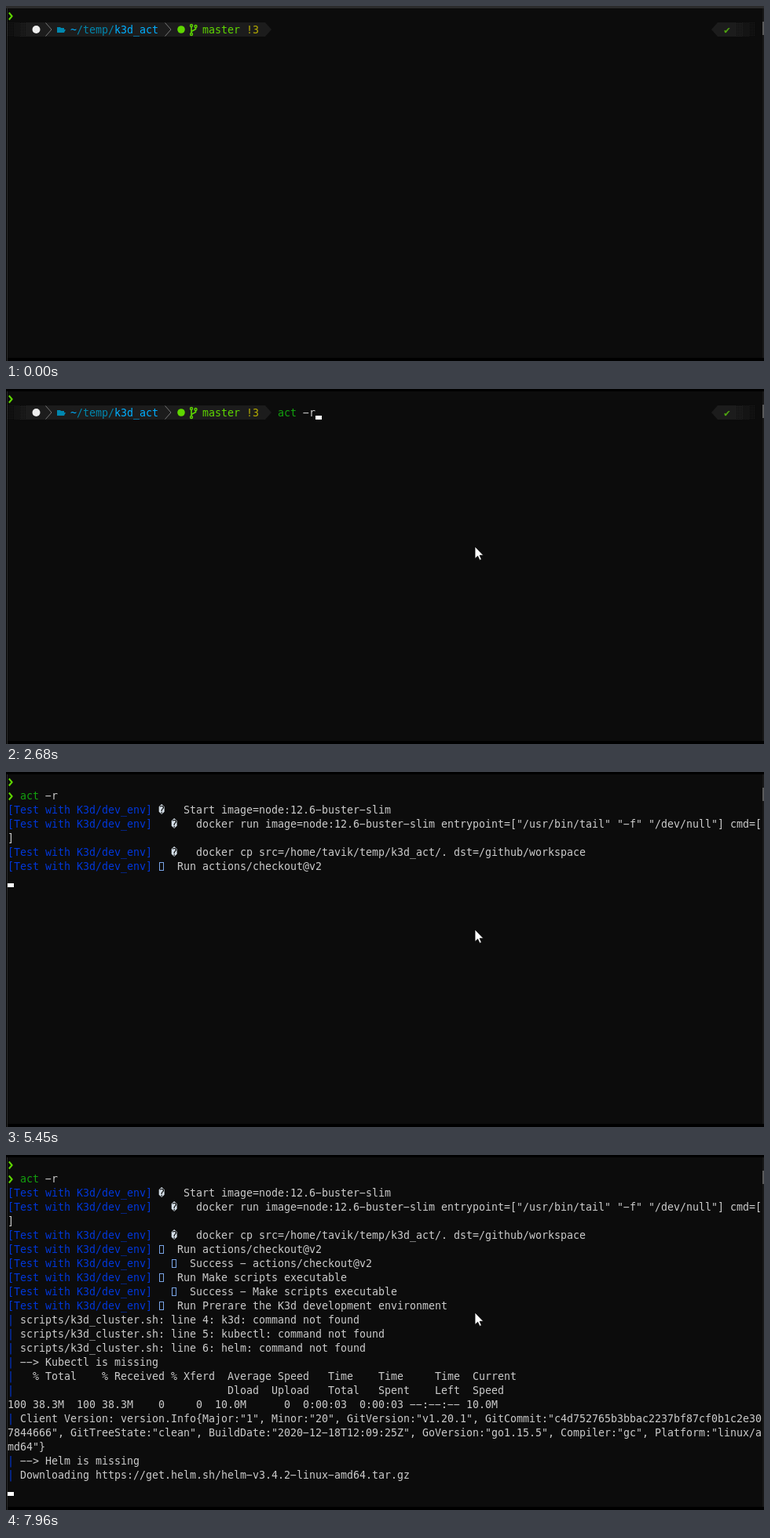
Write an HTML page with a canvas that moves like this. It is 965 by 453 pixels and loops after 8000 ms.

```html
<!DOCTYPE html>
<html lang="en">
<head>
<meta charset="utf-8">
<title>Terminal session</title>
<style>
html, body { margin: 0; width: 965px; height: 453px; overflow: hidden; background: #000; }
canvas { display: block; }
</style>
</head>
<body>
<canvas id="stage" width="965" height="453"></canvas>
<script>
const ctx = document.getElementById('stage').getContext('2d');
const LOOP = 8000, CELL = 8, ROW = 18;
const BG = '#0c0c0c', BAR = '#1c1c1c', FG = '#cccccc', BLUE = '#0037da', GREEN = '#13a10e',
      LIME = '#5fd700', DIR = '#0087af', SKY = '#00afff', TINT = '#7aa5e6';
const TAG = '[Test with K3d/dev_env]';

// Each output line: time of appearance, text
const output = [
  [3300, TAG + ' \uFFFD   Start image=node:12.6-buster-slim'],
  [4340, TAG + '   \uFFFD   docker run image=node:12.6-buster-slim entrypoint=["/usr/bin/tail" "-f" "/dev/null"] cmd=['],
  [4340, ']'],
  [4490, TAG + '   \uFFFD   docker cp src=/home/tavik/temp/k3d_act/. dst=/github/workspace'],
  [5450, TAG + ' ▯  Run actions/checkout@v2'],
  [5520, TAG + '   ▯  Success - actions/checkout@v2'],
  [5520, TAG + ' ▯  Run Make scripts executable'],
  [6460, TAG + '   ▯  Success - Make scripts executable'],
  [6540, TAG + ' ▯  Run Prerare the K3d development environment'],
  [6620, '| scripts/k3d_cluster.sh: line 4: k3d: command not found'],
  [6620, '| scripts/k3d_cluster.sh: line 5: kubectl: command not found'],
  [6620, '| scripts/k3d_cluster.sh: line 6: helm: command not found'],
  [6620, '| --> Kubectl is missing'],
  [6850, '|   % Total    % Received % Xferd  Average Speed   Time    Time     Time  Current'],
  [6850, '|                                  Dload  Upload   Total   Spent    Left  Speed'],
  [7250, '100 38.3M  100 38.3M    0     0  10.0M      0  0:00:03  0:00:03 --:--:-- 10.0M'],
  [7330, '| Client Version: version.Info{Major:"1", Minor:"20", GitVersion:"v1.20.1", GitCommit:"c4d752765b3bbac2237bf87cf0b1c2e30'],
  [7330, '7844666", GitTreeState:"clean", BuildDate:"2020-12-18T12:09:25Z", GoVersion:"go1.15.5", Compiler:"gc", Platform:"linux/a'],
  [7330, 'md64"}'],
  [7330, '| --> Helm is missing'],
  [7960, '| Downloading https://get.helm.sh/helm-v3.4.2-linux-amd64.tar.gz']
];

const colX = col => 2 + col * CELL;
const rowY = row => 3 + row * ROW;

function rect(x, y, w, h, color) {
  ctx.fillStyle = color;
  ctx.fillRect(x, y, w, h);
}

function trace(points) {
  ctx.beginPath();
  points.forEach(([x, y]) => ctx.lineTo(x, y));
}

function fill(points, color) {
  trace(points);
  ctx.fillStyle = color;
  ctx.fill();
}

function stroke(points, color, width) {
  trace(points);
  ctx.strokeStyle = color;
  ctx.lineWidth = width;
  ctx.stroke();
}

function disc(x, y, r, color) {
  ctx.beginPath();
  ctx.arc(x, y, r, 0, 7);
  ctx.fillStyle = color;
  ctx.fill();
}

// Text on the character grid; hyphens are drawn wide
function text(str, col, row, color) {
  [...str].forEach((ch, i) => {
    const x = colX(col + i), y = rowY(row);
    if (ch === '▯') {
      ctx.strokeStyle = TINT;
      ctx.lineWidth = 1;
      ctx.strokeRect(x + 1.5, y + 4.5, 5, 10);
    } else if (ch !== ' ') {
      ctx.fillStyle = ch === '\uFFFD' ? '#d5dfe8' : color;
      ctx.fillText(ch === '-' ? '−' : ch, x, y + 14);
    }
  });
}

function line(str, row) {
  const head = str.startsWith(TAG) ? TAG.length : str[0] === '|' ? 1 : 0;
  text(str.slice(0, head), 0, row, BLUE);
  text(str.slice(head), head, row, FG);
}

function arrowPrompt(row) {
  const y = rowY(row);
  stroke([[3.8, y + 5.5], [7.6, y + 10], [3.8, y + 14.5]], LIME, 2);
}

// Dotted cell, level 1 (sparse) to 3 (dense)
function shade(col, level) {
  for (let y = 0; y < ROW; y++)
    for (let x = 0; x < CELL; x++) {
      const even = (x + y) % 2 === 0, sparse = x % 2 === 0 && y % 2 === 0;
      const on = level === 1 ? sparse : level === 2 ? even : !sparse;
      if (on) rect(colX(col) + x, rowY(1) + y, 1, 1, BAR);
    }
}

function separator(col) {
  const x = colX(col);
  stroke([[x + 0.5, 21.5], [x + 8, 30], [x + 0.5, 38.5]], '#777', 1);
}

function branch() {
  stroke([[236, 25], [236, 35]], LIME, 1.6);
  stroke([[241.5, 27], [241.5, 29.5], [236, 32.5]], LIME, 1.6);
  for (const [x, y] of [[236, 25], [241.5, 26], [236, 36]]) {
    disc(x, y, 2.2, LIME);
    disc(x, y, 0.8, BAR);
  }
}

function statusBar() {
  for (let i = 0; i < 3; i++) {
    shade(i, i + 1);
    shade(116 + i, 3 - i);
  }
  rect(26, 21, 304, ROW, BAR);
  fill([[330, 21], [338, 30], [330, 39]], BAR);
  rect(906, 21, 24, ROW, BAR);
  fill([[906, 21], [898, 30], [906, 39]], BAR);

  disc(38.5, 30, 5, '#eee');
  separator(6);
  fill([[65, 27], [69, 27], [70, 28], [74, 28], [74, 30], [76, 30], [74, 34], [65, 34]], DIR);
  text('~', 10, 1, SKY);
  text('/temp/', 11, 1, DIR);
  text('k3d_act', 17, 1, SKY);
  separator(25);
  disc(223, 30, 4.8, LIME);
  branch();
  text('master', 31, 1, LIME);
  text('!3', 38, 1, '#b5ac00');
  text('✔', 114, 1, '#4fa510');
}

function command(str, col) {
  text(str.slice(0, 3), col, 1, GREEN);
  text(str.slice(3), col + 3, 1, FG);
}

function caret(col, row) {
  rect(colX(col), rowY(row) + 13, CELL, 5, '#fff');
}

// Pointer moves in 80 ms steps: up from the bottom edge, a pause, then to its rest
function pointer(t) {
  if (t < 70) return;
  const glide = (start, from, to) => {
    const k = Math.min(7, Math.max(0, Math.floor((t - start) / 80))) / 7;
    const e = k * k * (3 - 2 * k);
    return from.map((v, i) => Math.round(v + (to[i] - v) * e));
  };
  const [x, y] = t < 780 ? glide(70, [841, 442], [403, 73]) : glide(780, [403, 73], [597, 201]);
  const shape = [[0, 0], [0, 15.5], [3.6, 12.2], [6, 17.4], [8.4, 16.4], [6.1, 11.3], [10.8, 11.3], [0, 0]]
    .map(([dx, dy]) => [x + dx, y + dy]);
  fill(shape, '#fff');
  stroke(shape, '#000', 0.8);
}

function draw(t) {
  const focused = t >= 1180;
  rect(0, 0, 965, 453, '#000');
  rect(1, 3, 964, 446, BG);
  rect(1, 3, 1, 450, '#2b2b2b');
  rect(963, 3, 2, 446, '#171717');
  rect(963, 20, 2, 17, '#5a5a5a');
  if (!focused) rect(0, 0, 965, 3, '#2b2b2b');

  ctx.font = '13.288px "DejaVu Sans Mono", monospace';
  arrowPrompt(0);
  if (t < 3140) {
    const typed = t < 1820 ? '' : t < 2680 ? 'act -' : 'act -r';
    statusBar();
    command(typed, 43);
    if (focused) caret(43 + typed.length, 1);
  } else {
    const shown = output.filter(([at]) => t >= at);
    arrowPrompt(1);
    command('act -r', 2);
    shown.forEach(([, str], i) => line(str, i + 2));
    caret(0, shown.length + 2);
  }
  pointer(t);
}

const begin = performance.now();
function tick() {
  draw((performance.now() - begin) % LOOP);
  requestAnimationFrame(tick);
}
tick();
</script>
</body>
</html>
```
